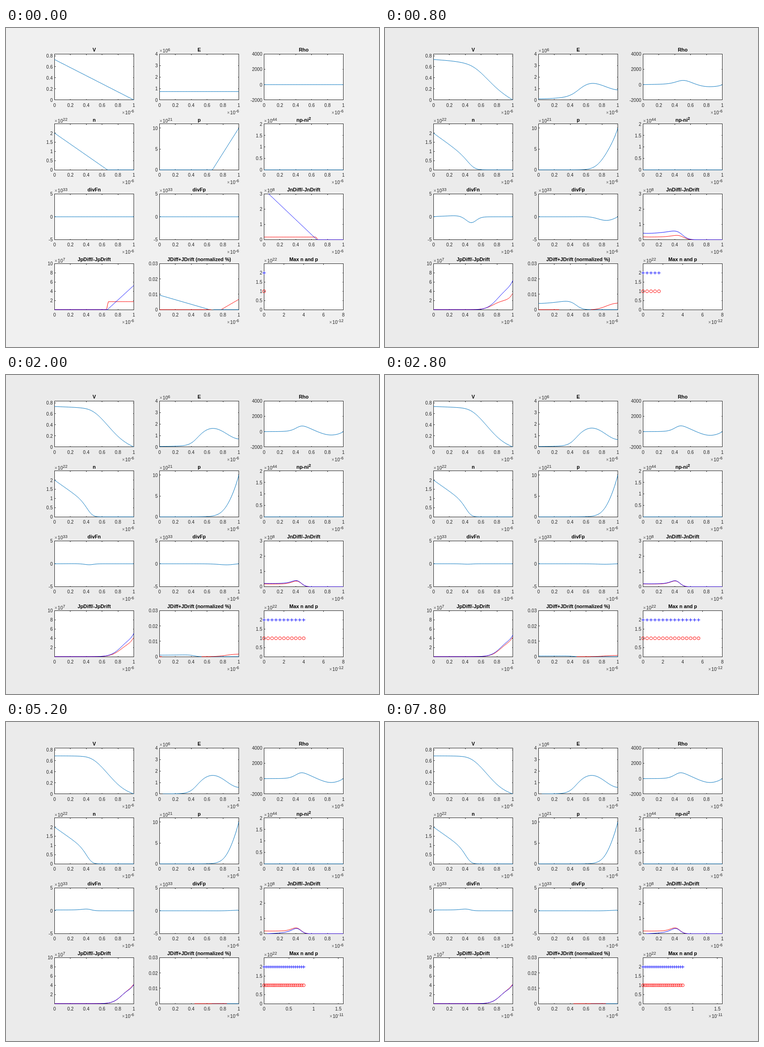
These frames come from a looping animation (810 by 691 pixels, 8 s). An HTML page:

```html
<!DOCTYPE html>
<html lang="en">
<head>
<meta charset="utf-8">
<title>Drift-diffusion relaxation</title>
<style>
  html, body { margin: 0; width: 100%; height: 100%; overflow: hidden; background: #ebebeb; }
  svg { display: block; width: 810px; height: 691px; font: 10px "Liberation Sans", Arial, sans-serif; fill: #262626; }
  .frame { fill: none; stroke: #262626; shape-rendering: crispEdges; }
  .area { fill: #fff; }
  .title { font-size: 10.8px; font-weight: bold; fill: #000; text-anchor: middle; }
  .mid { text-anchor: middle; }
  .end { text-anchor: end; }
  .times { fill: #666; }
  .curve { fill: none; stroke-width: 1; stroke-linejoin: round; }
</style>
</head>
<body>
<svg id="stage" viewBox="0 0 810 691"></svg>
<script>
const BLUE = '#0072bd', RED = '#f00', PURE = '#00f';
const WIDTH = 172, HEIGHT = 99.4, LEFT = [105.5, 333.5, 560.5], TOP = 56.45, ROW = 151.4;
const STEP_MS = 200, STEPS = 40, LAST_SAVED = 20;

// One-dimensional p-n junction, SI units
const N = 100, LENGTH = 1e-6, DX = LENGTH / N;
const Q = 1.602e-19, EPS = 1.035e-10, VT = 0.02585, NI = 1e16;
const MU_N = 0.14, MU_P = 0.045, DIFF = MU_N * VT;
const BIAS = 0.731, LOW_BIAS = 0.688;
const FRAME_DT = 4e-13, SUB = 50;

const nodes = f => Array.from({ length: N + 1 }, (_, i) => f(i));
const donors = nodes(i => Math.max(0, 2e22 * (1 - 1.5 * i / N)));
const acceptors = nodes(i => Math.max(0, 1e22 * (3 * i / N - 2)));

// Field on cell midpoints from the space charge, shifted to meet the bias
function solveField(n, p, bias) {
  const rho = nodes(i => Q * (p[i] - n[i] + donors[i] - acceptors[i]));
  const mid = [0];
  for (let i = 1; i < N; i++) mid[i] = mid[i - 1] + rho[i] * DX / EPS;
  const shift = bias / LENGTH - mid.reduce((a, b) => a + b) / N;
  return { rho, mid: mid.map(e => e + shift) };
}

// Rate of change from the difference of neighbouring fluxes; ends are held
function divergence(c, mid, mobility) {
  const flux = mid.map((e, i) => DIFF * (c[i + 1] - c[i]) / DX + mobility * e * (c[i] + c[i + 1]) / 2);
  return nodes(i => i % N ? (flux[i] - flux[i - 1]) / DX : 0);
}

function snapshot(n, p, bias, first) {
  const { rho, mid } = solveField(n, p, bias);
  const E = nodes(i => (mid[Math.max(0, i - 1)] + mid[Math.min(N - 1, i)]) / 2);
  const V = nodes(() => 0);
  for (let i = N - 1; i >= 0; i--) V[i] = V[i + 1] + mid[i] * DX;
  const slope = c => nodes(i => {
    const a = Math.max(0, i - 1), b = Math.min(N, i + 1);
    return (c[b] - c[a]) / ((b - a) * DX);
  });
  const scaled = (values, unit) => values.map(v => v / unit);
  const diffN = slope(n).map(s => -Q * DIFF * s), diffP = slope(p).map(s => Q * DIFF * s);
  const driftN = n.map((c, i) => Q * MU_N * c * E[i]), driftP = p.map((c, i) => Q * MU_P * c * E[i]);
  const imbalance = (drift, diff) => {
    const peak = Math.max(...drift);
    return drift.map((d, i) => (d - diff[i]) / peak / 100);
  };
  const rate = (c, mobility) => first ? nodes(() => 0) : scaled(divergence(c, mid, mobility), 1e33);
  return [
    [V], [scaled(E, 1e6)], [rho],
    [scaled(n, 1e22)], [scaled(p, 1e21)], [n.map((c, i) => (c * p[i] - NI * NI) / 1e44)],
    [rate(n, MU_N)], [rate(p, -MU_P)], [scaled(diffN, 1e8), scaled(driftN, 1e8)],
    [scaled(diffP, 1e7), scaled(driftP, 1e7)], [imbalance(driftN, diffN), imbalance(driftP, diffP)], []
  ];
}

function simulate() {
  let n = donors.map(d => Math.max(d, NI)), p = acceptors.map(a => Math.max(a, NI));
  const states = [snapshot(n, p, BIAS, true)], dt = FRAME_DT / SUB;
  for (let k = 1; k <= LAST_SAVED; k++) {
    for (let s = 0; s < SUB; s++) {
      const { mid } = solveField(n, p, BIAS);
      const dn = divergence(n, mid, MU_N), dp = divergence(p, mid, -MU_P);
      n = n.map((c, i) => c + dn[i] * dt);
      p = p.map((c, i) => c + dp[i] * dt);
    }
    states.push(snapshot(n, p, BIAS));
  }
  states.push(snapshot(n, p, LOW_BIAS));
  return states;
}

const halves = [0, 0.5, 1, 1.5, 2], both = [RED, PURE];
const panels = [
  { title: 'V', lo: 0, hi: 0.83, ticks: [0, 0.2, 0.4, 0.6, 0.8] },
  { title: 'E', lo: 0, hi: 4, ticks: [0, 1, 2, 3, 4], exp: 6 },
  { title: 'Rho', lo: -2000, hi: 4000, ticks: [-2000, 0, 2000, 4000] },
  { title: 'n', lo: 0, hi: 2.5, ticks: halves, exp: 22 },
  { title: 'p', lo: 0, hi: 11, ticks: [0, 5, 10], exp: 21 },
  { title: 'np-ni<tspan dy="-4" font-size="9">2</tspan>', lo: 0, hi: 2, ticks: halves, exp: 44 },
  { title: 'divFn', lo: -5, hi: 5, ticks: [-5, 0, 5], exp: 33 },
  { title: 'divFp', lo: -5, hi: 5, ticks: [-5, 0, 5], exp: 33 },
  { title: 'JnDiff/-JnDrift', lo: 0, hi: 3, ticks: [0, 1, 2, 3], exp: 8, colors: both },
  { title: 'JpDiff/-JpDrift', lo: 0, hi: 10, ticks: [2, 4, 6, 8, 10], exp: 7, colors: both },
  { title: 'JDiff+JDrift (normalized %)', lo: 0, hi: 0.03, ticks: [0, 0.01, 0.02, 0.03], colors: [BLUE, RED] },
  { title: 'Max n and p', lo: 0, hi: 2.5, ticks: halves, exp: 22, colors: [PURE, RED] }
];
panels.forEach((panel, i) => {
  panel.x = LEFT[i % 3];
  panel.y = TOP + ROW * Math.floor(i / 3);
  panel.bottom = panel.y + HEIGHT;
  panel.toY = v => panel.bottom - (v - panel.lo) / (panel.hi - panel.lo) * HEIGHT;
});

const snap = v => Math.floor(v) + 0.5;
const text = (cls, x, y, body) => `<text class="${cls}" x="${x}" y="${y}">${body}</text>`;
const power = e => `<tspan class="times">×</tspan><tspan dx="1">10</tspan><tspan dy="-3.5" font-size="9">${e}</tspan>`;

function xAxis({ x, y, bottom }, max, ticks, exp) {
  let marks = '', labels = '';
  for (const t of ticks) {
    const px = x + t / max * WIDTH;
    marks += `M${snap(px)} ${snap(bottom)}v-2M${snap(px)} ${snap(y)}v2`;
    labels += text('mid', px, bottom + 14.8, t);
  }
  return `<path class="frame" d="${marks}"/>${labels}` + text('end', x + WIDTH + 0.5, bottom + 30.7, power(exp));
}

function panelMarkup(panel, i) {
  const { x, y, bottom, ticks, exp, toY, colors = [BLUE] } = panel;
  const top = snap(y), tall = snap(bottom) - top;
  let marks = '', labels = '';
  for (const t of ticks) {
    const line = snap(toY(t));
    marks += `M${x} ${line}h2M${x + WIDTH} ${line}h-2`;
    labels += text('end', x - 4, toY(t) + 3.8, t);
  }
  const xAxes = i < 11
    ? xAxis(panel, 1, [0, 0.2, 0.4, 0.6, 0.8, 1], -6)
    : `<g id="early">${xAxis(panel, 8, [0, 2, 4, 6, 8], -12)}</g><g id="late">${xAxis(panel, 1.6, [0, 0.5, 1, 1.5], -11)}</g>`;
  const clip = i < 11 ? ` clip-path="url(#clip${i})"` : '';
  return `<clipPath id="clip${i}"><rect x="${x - 0.5}" y="${top - 0.5}" width="${WIDTH + 1}" height="${tall + 1}"/></clipPath>
    <rect class="area" x="${x}" y="${top}" width="${WIDTH}" height="${tall}"/>
    <path class="frame" d="M${x} ${top}h${WIDTH}v${tall}h${-WIDTH}z${marks}"/>${labels}${xAxes}
    ${text('title', x + WIDTH / 2, y - 5.3, panel.title)}${exp ? text('', x, y - 3, power(exp)) : ''}
    <g${clip}>${colors.map((c, j) => `<path class="curve" id="curve${i}-${j}" stroke="${c}"/>`).join('')}</g>`;
}

const byId = id => document.getElementById(id);
byId('stage').innerHTML = panels.map(panelMarkup).join('');

// Points below the lower limit leave a gap, up to single precision
function curvePath({ x, lo, hi, toY }, values) {
  const floor = lo - 1e-6 * (hi - lo);
  let d = '', pen = 'M';
  values.forEach((v, i) => {
    if (v < floor) { pen = 'M'; return; }
    d += `${pen}${(x + i / N * WIDTH).toFixed(2)} ${toY(v).toFixed(2)}`;
    pen = 'L';
  });
  return d;
}

function drawMarkers(count, max) {
  const { x, toY } = panels[11];
  let plus = '', rings = '';
  for (let i = 0; i < count; i++) {
    const px = x + 0.4 * i / max * WIDTH;
    plus += `M${px - 3.5} ${toY(2)}h7M${px} ${toY(2) - 3.5}v7`;
    rings += `M${px - 3.2} ${toY(1)}a3.2 3.2 0 1 0 6.4 0a3.2 3.2 0 1 0-6.4 0`;
  }
  byId('curve11-0').setAttribute('d', plus);
  byId('curve11-1').setAttribute('d', rings);
}

const states = simulate();
function draw(step) {
  const late = step > LAST_SAVED;
  states[Math.min(step, LAST_SAVED + 1)].forEach((curves, i) => curves.forEach((values, j) =>
    byId(`curve${i}-${j}`).setAttribute('d', curvePath(panels[i], values))));
  byId('early').style.display = late ? 'none' : '';
  byId('late').style.display = late ? '' : 'none';
  drawMarkers(Math.min(step, LAST_SAVED) + 1, late ? 16 : 8);
  document.body.style.background = step ? '#ebebeb' : '#f0f0f0';
}

const start = performance.now();
let shown = -1;
function tick() {
  const step = Math.floor((performance.now() - start) / STEP_MS) % STEPS;
  if (step !== shown) draw(shown = step);
  requestAnimationFrame(tick);
}
tick();
</script>
</body>
</html>
```
